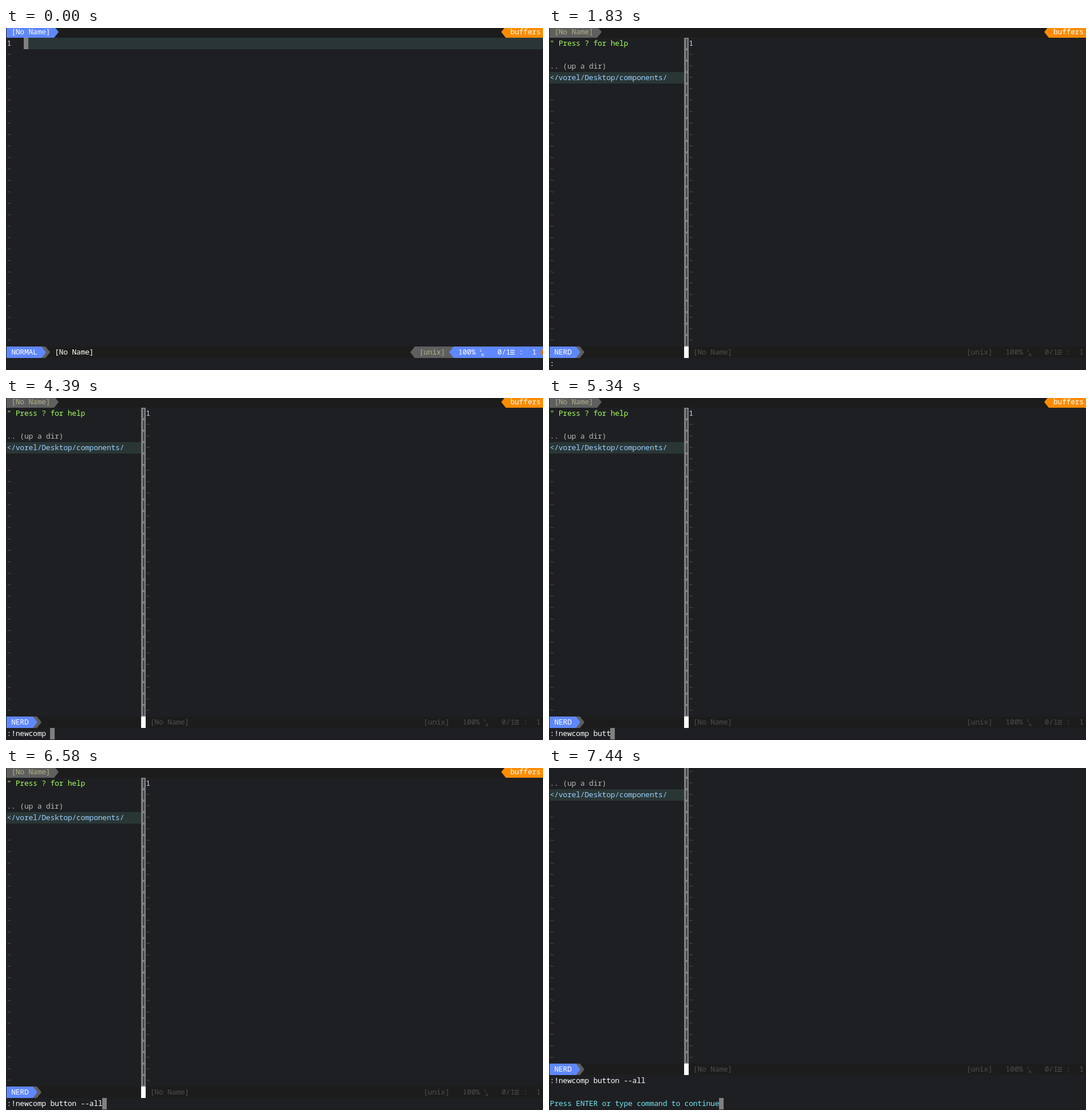
Recreate the animation shown at these times as an HTML page. Size 938 px wide and 597 px high, loop 8000 ms.

```html
<!DOCTYPE html>
<html lang="en">
<head>
<meta charset="utf-8">
<title>Editor session</title>
<style>
  html, body { margin: 0; width: 100%; height: 100%; overflow: hidden; background: #1e1f22; }
  svg { display: block; width: 938px; height: 597px; }
  text { font: 13px "Noto Sans Mono", "DejaVu Sans Mono", monospace; letter-spacing: -.22px; white-space: pre; }
  .tiny { font-size: 7.5px; letter-spacing: 0; }
</style>
</head>
<body>
<svg id="stage" viewBox="0 0 938 597"></svg>
<script>
const NS = 'http://www.w3.org/2000/svg';
const stage = document.getElementById('stage');
const CELL = 7.58, LEFT = 1.6, END = 938, LOOP = 8000;
const C = {
  bar: '#1c1c1c', line: '#2a3636', cursor: '#808080', tilde: '#4d5858',
  blue: '#5f87ff', gray: '#5f5f5f', khaki: '#afaf87', orange: '#ff8c00',
  dim: '#4e4e4e', white: '#ffffff', number: '#d5d0e6', split: '#808080',
  green: '#a5ff60', plain: '#b8b8b4', path: '#9cd0ff', cyan: '#70e6f5'
};

const px = col => LEFT + col * CELL;
const py = row => Math.round(17 + (row - 1) * 19.975);

function add(parent, tag, attrs, content) {
  const el = document.createElementNS(NS, tag);
  for (const k in attrs) el.setAttribute(k, attrs[k]);
  if (content !== undefined) el.textContent = content;
  parent.appendChild(el);
  return el;
}
const rect = (g, x, y, width, height, fill) => add(g, 'rect', { x, y, width, height, fill });
const write = (g, col, row, str, fill) =>
  add(g, 'text', { x: px(col), y: py(row) + 14, fill }, str);

// Fill whole cells from column a to column b on a row.
function fill(g, a, b, row, color) {
  const x = Math.floor(px(a));
  return rect(g, x, py(row), Math.floor(px(b)) - x, 20, color);
}
// Solid separator filling one cell; dir 1 points right, -1 points left.
function arrow(g, col, row, dir, color) {
  const y = py(row), a = Math.floor(px(col)), b = a + 8;
  const base = dir > 0 ? a : b, tip = dir > 0 ? b : a;
  return add(g, 'path', { d: `M${base} ${y}L${tip} ${y + 10}L${base} ${y + 20}Z`, fill: color });
}
function tildes(g, col, from) {
  for (let row = from; row <= 27; row++) write(g, col, row, '~', C.tilde);
}
function tabs(g, bg, fg) {
  rect(g, 1, 0, END, 17, C.bar);
  fill(g, 0, 11, 0, bg);
  arrow(g, 11, 0, 1, bg);
  write(g, 1, 0, '[No Name]', fg);
  arrow(g, 114, 0, -1, C.orange);
  rect(g, 873, -3, 65, 20, C.orange);
  write(g, 116, 0, 'buffers', C.white);
}
function mode(g, name) {
  const end = name.length + 2;
  fill(g, 0, end, 28, C.blue);
  fill(g, end, end + 1, 28, C.gray);
  arrow(g, end, 28, 1, C.blue);
  arrow(g, end + 1, 28, 1, C.gray);
  write(g, 1, 28, name, C.white);
}
function position(g, col, color) {
  const y = py(28);
  write(g, col, 28, '100%', color);
  const x = px(col + 5);
  add(g, 'text', { x: x - .5, y: y + 9, fill: color, class: 'tiny' }, 'L');
  add(g, 'text', { x: x + 2.5, y: y + 17, fill: color, class: 'tiny' }, 'N');
  write(g, col + 9, 28, '0/1', color);
  for (let i = 0; i < 3; i++) rect(g, px(col + 12), y + 6 + i * 3.4, 7.4, 1.3, color);
  write(g, col + 14, 28, ':', color);
  write(g, col + 17, 28, '1', color);
}

function buildEmpty() {
  const g = add(stage, 'g', {});
  tabs(g, C.blue, C.white);
  rect(g, 32, 17, 906, 20, C.line);
  write(g, 0, 1, '1', C.number);
  tildes(g, 0, 2);
  rect(g, 1, py(28), END, 20, C.bar);
  mode(g, 'NORMAL');
  write(g, 11, 28, '[No Name]', C.white);
  arrow(g, 93, 28, -1, C.gray);
  fill(g, 94, 103, 28, C.gray);
  write(g, 95, 28, '[unix]', C.khaki);
  arrow(g, 102, 28, -1, C.blue);
  fill(g, 103, 124, 28, C.blue);
  position(g, 104, C.white);
  arrow(g, 123, 28, -1, '#e86a10');
  return g;
}

function buildTree() {
  const g = add(stage, 'g', {});
  tabs(g, C.gray, C.khaki);
  write(g, 0, 1, '" Press ? for help', C.green);
  write(g, 0, 3, '.. (up a dir)', C.plain);
  fill(g, 0, 31, 4, C.line);
  write(g, 0, 4, '</vorel/Desktop/components/', C.path);
  tildes(g, 0, 6);
  rect(g, 236, 17, 8, py(28) - 17, C.split);
  for (let row = 1; row < 28; row++) rect(g, 239.6, py(row) + 2, 1.6, 16, '#26272a');
  write(g, 32, 1, '1', C.number);
  tildes(g, 32, 2);
  rect(g, 1, py(28), END, 20, C.bar);
  mode(g, 'NERD');
  rect(g, 236, py(28), 8, 20, C.white);
  write(g, 33, 28, '[No Name]', C.dim);
  write(g, 96, 28, '[unix]', C.dim);
  position(g, 105, C.dim);
  return g;
}

const empty = buildEmpty();
const tree = buildTree();
const command = write(tree, 0, 29, '', C.white);
const prompt = 'Press ENTER or type command to continue';
const enter = write(stage, 0, 29, prompt, C.cyan);
const cursor = rect(stage, 0, 0, 8, 20, C.cursor);
const under = write(stage, 0, 4, '<', C.white);
under.setAttribute('font-weight', 'bold');

const typed = ':!newcomp button --all';
const keys = [1110, 2790, 3140, 3260, 3320, 3620, 3800, 3850, 4150, 4390, 4860, 4920,
  5160, 5340, 5400, 5460, 5810, 5990, 6170, 6340, 6400, 6580];
const blinks = [[120, 330], [1830, 2070], [2490, 2730], [7240, 7290]];

const show = (el, on) => el.setAttribute('visibility', on ? 'visible' : 'hidden');

function cursorCell(t, count) {
  if (t < 510) return [4, 1];
  if (t < 1110) return [0, 4];
  if (t < 7240) return [count, 29];
  return [t < 7440 ? 0 : prompt.length, 29];
}

function draw(t) {
  const count = keys.filter(k => k <= t).length;
  const scroll = t < 7240 ? 0 : t < 7440 ? 1 : 2;
  const [col, row] = cursorCell(t, count);
  show(empty, t < 510);
  show(tree, t >= 510);
  tree.setAttribute('transform', `translate(0 ${-20 * scroll})`);
  command.textContent = typed.slice(0, count);
  show(enter, t >= 7440);
  cursor.setAttribute('x', Math.floor(px(col)));
  cursor.setAttribute('y', py(row));
  show(cursor, !blinks.some(([a, b]) => t >= a && t < b));
  show(under, t >= 510 && t < 1110);
}

const start = performance.now();
function tick(now) {
  draw(Math.max(0, now - start) % LOOP);
  requestAnimationFrame(tick);
}
draw(0);
requestAnimationFrame(tick);
</script>
</body>
</html>
```
